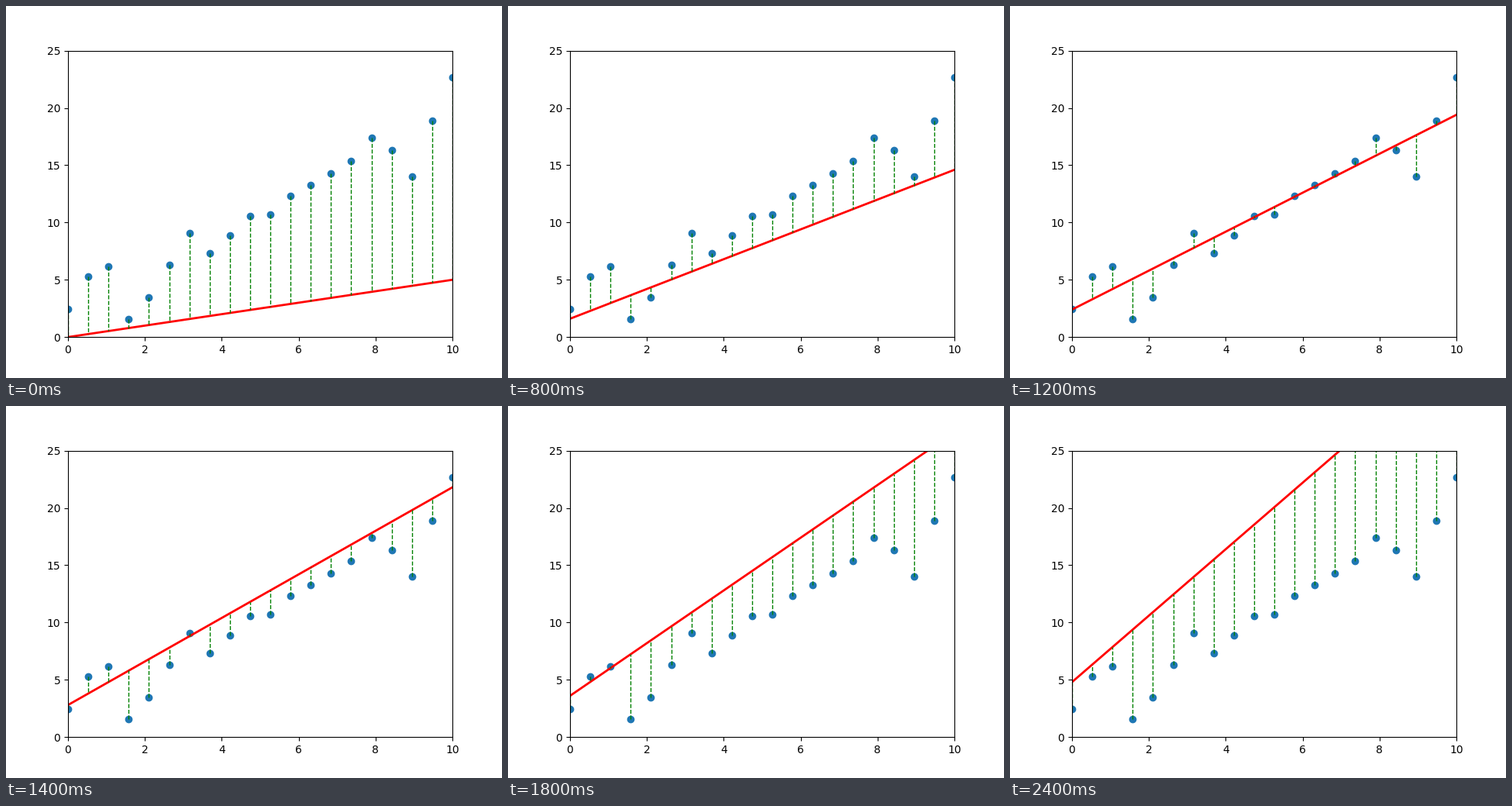
A matplotlib script that plays this animation: 640x480 px, repeating every 2.5 s.

```python
import numpy as np
import matplotlib.pyplot as plt
from matplotlib.animation import FuncAnimation

FRAMES = 25

x = np.linspace(0, 10, 20)
y = np.array([2.42, 5.28, 6.16, 1.56, 3.45, 6.29, 9.07, 7.30, 8.87, 10.55,
              10.70, 12.32, 13.26, 14.28, 15.37, 17.39, 16.31, 14.01, 18.88, 22.67])

fig, ax = plt.subplots(figsize=(6.4, 4.8), dpi=100)
ax.set_xlim(0, 10)
ax.set_ylim(0, 25)
ax.scatter(x, y)
line, = ax.plot([], [], color="red", lw=2)
residuals = [ax.plot([], [], color="green", ls="--", lw=1)[0] for _ in x]


def update(i):
    slope, intercept = 0.5 + 0.1 * i, 0.2 * i
    fit = slope * x + intercept
    line.set_data(x, fit)
    # Each residual starts at its point, so the dashes stay put as the line moves
    for res, xi, yi, fi in zip(residuals, x, y, fit):
        res.set_data([xi, xi], [yi, fi])
    return [line, *residuals]


anim = FuncAnimation(fig, update, frames=FRAMES, interval=100,
                     repeat=True, repeat_delay=0)
plt.show()
```
